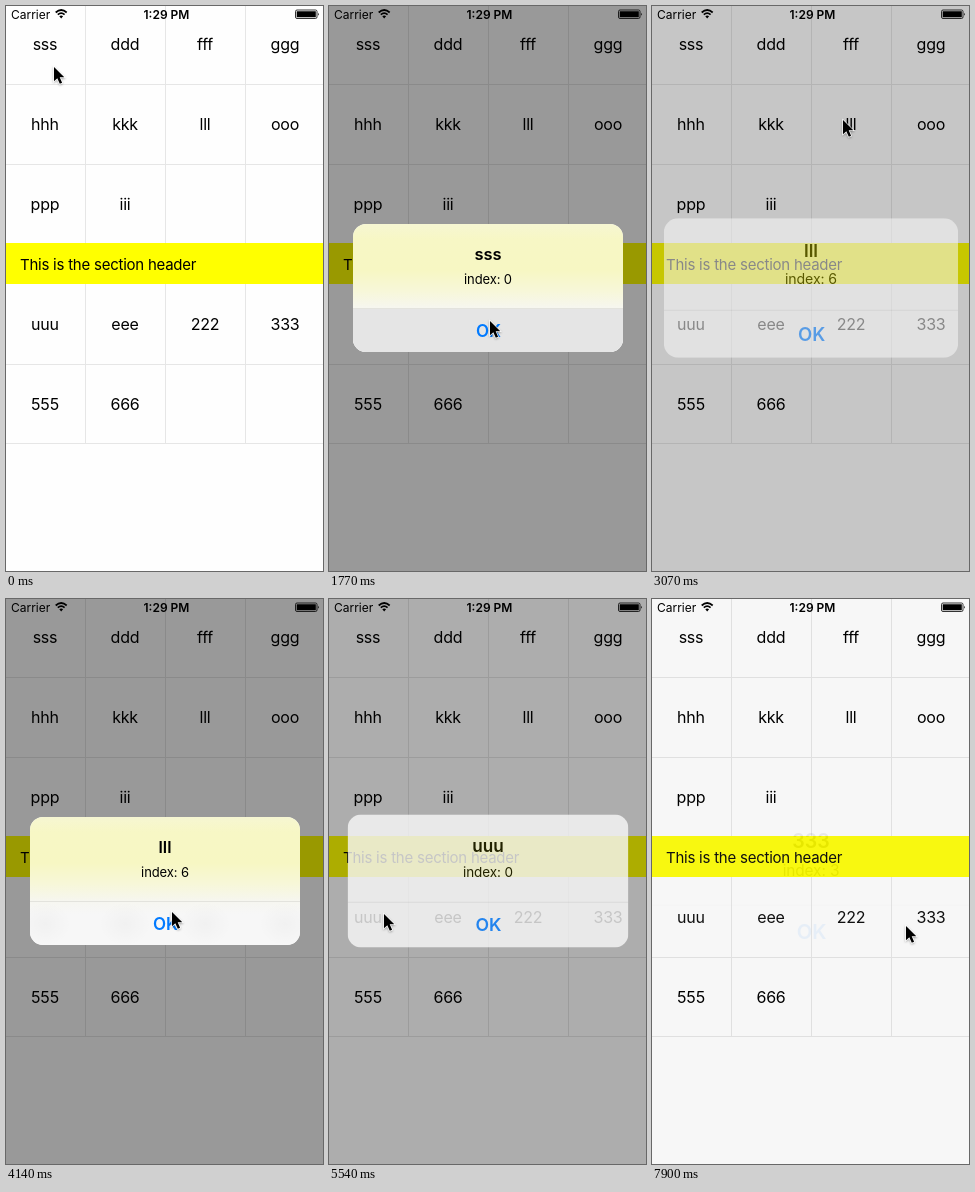
An HTML page for the animation above (8 s loop, 317x565 px).

```html
<!DOCTYPE html>
<html lang="en">
<head>
<meta charset="utf-8">
<title>Grid with alerts</title>
<style>
  html, body { margin: 0; width: 100%; height: 100%; overflow: hidden; background: #fefefe; }
  svg { display: block; width: 317px; height: 565px; }
  text { font-family: Inter, Roboto, sans-serif; }
  .cell { font-size: 16px; letter-spacing: -.2px; text-anchor: middle; }
  .header { font-size: 15px; letter-spacing: -.24px; }
  .status { font-size: 12px; }
  .bold { font-weight: 600; }
  #alert text { text-anchor: middle; }
  #title { font-size: 16.5px; font-weight: 600; }
  #index { font-size: 13px; letter-spacing: -.1px; }
  #ok { font-size: 17px; font-weight: 600; fill: #007aff; }
</style>
</head>
<body>
<svg viewBox="0 0 317 565">
  <defs>
    <linearGradient id="tint" x1="0" y1="0" x2="0" y2="1">
      <stop offset="0" stop-color="#f6f6d2"/>
      <stop offset=".12" stop-color="#f7f7c5"/>
      <stop offset=".36" stop-color="#f7f7c3"/>
      <stop offset=".52" stop-color="#f7f7d8"/>
      <stop offset=".66" stop-color="#f6f6f0"/>
      <stop offset=".76" stop-color="#f7f7f7"/>
    </linearGradient>
    <radialGradient id="smudge">
      <stop offset="0" stop-opacity=".025"/>
      <stop offset="1" stop-opacity="0"/>
    </radialGradient>
    <clipPath id="panel"><rect x="24" y="218" width="270" height="128" rx="13"/></clipPath>
    <filter id="shadow" x="-50%" y="-50%" width="200%" height="200%">
      <feDropShadow dx="0" dy="1" stdDeviation="1" flood-opacity=".35"/>
    </filter>
  </defs>

  <rect width="317" height="565" fill="#fefefe"/>
  <rect id="press" width="79" fill="#d9d9d9"/>
  <path d="M79.5 0V237M159.5 0V237M239.5 0V237M0 78.5H317M0 158.5H317
           M79.5 278V438M159.5 278V438M239.5 278V438M0 358.5H317M0 437.5H317" stroke="#e6e6e6"/>
  <g id="cells"></g>
  <rect y="237" width="317" height="41" fill="#ff0"/>
  <text class="header" x="14" y="263.5">This is the section header</text>

  <text class="status" x="5" y="12.5">Carrier</text>
  <text class="status bold" x="160.5" y="12.5" text-anchor="middle">1:29 PM</text>
  <g fill="none" stroke="#000" stroke-width="1.7">
    <path d="M49.7 6.5Q55.2 1.5 60.7 6.5M51.8 8.7Q55.2 5.6 58.6 8.7"/>
    <path d="M55.2 12.4L53.3 10.2Q55.2 8.8 57.1 10.2Z" fill="#000" stroke="none"/>
    <rect x="289.5" y="4" width="21.5" height="8.5" rx="1.5" stroke-width=".8"/>
    <path d="M290.7 5.2H309.8V11.3H290.7ZM312 6.7Q313.7 8.2 312 9.8Z" fill="#000" stroke="none"/>
  </g>

  <rect id="dim" width="317" height="565"/>
  <g id="alert">
    <g clip-path="url(#panel)">
      <rect x="24" y="218" width="270" height="128" fill="#f8f8f8"/>
      <g id="blur">
        <rect x="24" y="218" width="270" height="128" fill="url(#tint)"/>
        <g id="smudges" fill="url(#smudge)"></g>
      </g>
      <rect id="down" x="24" y="303" width="270" height="43" fill="#e5e5e5"/>
      <path d="M24 302.5H294" stroke="#000" stroke-opacity=".08"/>
    </g>
    <text id="title" x="159" y="254"></text>
    <text id="index" x="159" y="278"></text>
    <text id="ok" x="159.5" y="330.5">OK</text>
  </g>
  <path id="cursor" d="M0 0V14.2L3.3 11.2L5.8 16.8L8.1 15.8L5.7 10.3H10.3Z"
        stroke="#fff" stroke-width="1.2" paint-order="stroke" filter="url(#shadow)"/>
</svg>
<script>
const LOOP = 8000, STEPS = 68, STEP = LOOP / STEPS;
const el = id => document.getElementById(id);
const set = (id, attrs) => {
  for (const name in attrs) el(id).setAttribute(name, attrs[name]);
};

const rows = [
  [38, 'sss ddd fff ggg'], [118, 'hhh kkk lll ooo'], [198, 'ppp iii'],
  [318, 'uuu eee 222 333'], [398, '555 666']
];
el('cells').innerHTML = rows.map(([y, words]) => words.split(' ').map((word, i) =>
  `<text class="cell" x="${39 + i * 80}" y="${y + 5.5}">${word}</text>`).join('')).join('');
el('smudges').innerHTML = [39, 119, 199, 279].map(x =>
  `<ellipse cx="${x}" cy="325" rx="26" ry="22"/>`).join('');

// Steps: first visible, OK pressed, fading out; lead is the ms already run at the first step.
const alerts = [
  { title: 'sss', index: 0, show: 6, lead: 50, press: 15, hide: 16 },
  { title: 'lll', index: 6, show: 26, lead: 81, press: 36, hide: 37 },
  { title: 'uuu', index: 0, show: 46, lead: 14, press: 55, hide: 56 },
  { title: '333', index: 3, show: 67, lead: 18, press: 99, hide: 100 }
];
// First step, last step, x, y, height
const presses = [[4, 5, 0, 0, 78], [45, 45, 0, 278, 80], [65, 66, 240, 278, 80]];
// Step, x, y
const path = [
  [0, 48, 61], [1, 47, 57], [2, 47, 53], [8, 47, 53], [12, 157, 309], [13, 161, 315],
  [17, 161, 315], [21, 191, 119], [23, 191, 114], [28, 191, 114], [32, 167, 306],
  [35, 166, 313], [38, 167, 318], [39, 169, 322], [40, 150, 324], [42, 60, 317],
  [43, 55, 315], [48, 55, 315], [51, 112, 324], [53, 125, 325], [54, 135, 324],
  [55, 150, 325], [57, 155, 326], [59, 197, 337], [63, 254, 327], [68, 254, 327]
];

// Critically damped spring from 0 to 1
function spring(ms) {
  const w = Math.max(0, ms) * .0228;
  return 1 - (1 + w) * Math.exp(-w);
}

function cursorAt(n) {
  const i = path.findIndex(p => p[0] > n);
  const [n0, x0, y0] = path[i - 1], [n1, x1, y1] = path[i];
  const k = (n - n0) / (n1 - n0);
  return [x0 + (x1 - x0) * k, y0 + (y1 - y0) * k];
}

function draw(n) {
  const [x, y] = cursorAt(n);
  set('cursor', { transform: `translate(${x} ${y})` });

  const hit = presses.find(p => n >= p[0] && n <= p[1]);
  set('press', hit ? { x: hit[2], y: hit[3], height: hit[4] } : { height: 0 });

  const a = alerts.findLast(item => n >= item.show);
  let shown = 0, opacity = 0;
  if (a) {
    shown = spring((n - a.show) * STEP + a.lead);
    opacity = n < a.hide ? shown : 1 - spring((n - a.hide) * STEP + 50);
    if (opacity < .005) opacity = 0;
    el('title').textContent = a.title;
    el('index').textContent = 'index: ' + a.index;
    set('down', { opacity: n === a.press ? 1 : 0 });
  }
  const scale = 1.2 - .2 * shown;
  set('dim', { opacity: .4 * opacity });
  set('blur', { opacity: opacity > .97 ? 1 : 0 });
  set('alert', {
    opacity,
    transform: `translate(159 282) scale(${scale}) translate(-159 -282)`
  });
}

const start = performance.now();
function tick() {
  const t = (performance.now() - start) % LOOP;
  draw(Math.min(STEPS - 1, Math.floor((t + 5) / STEP)));
  requestAnimationFrame(tick);
}
tick();
</script>
</body>
</html>
```
